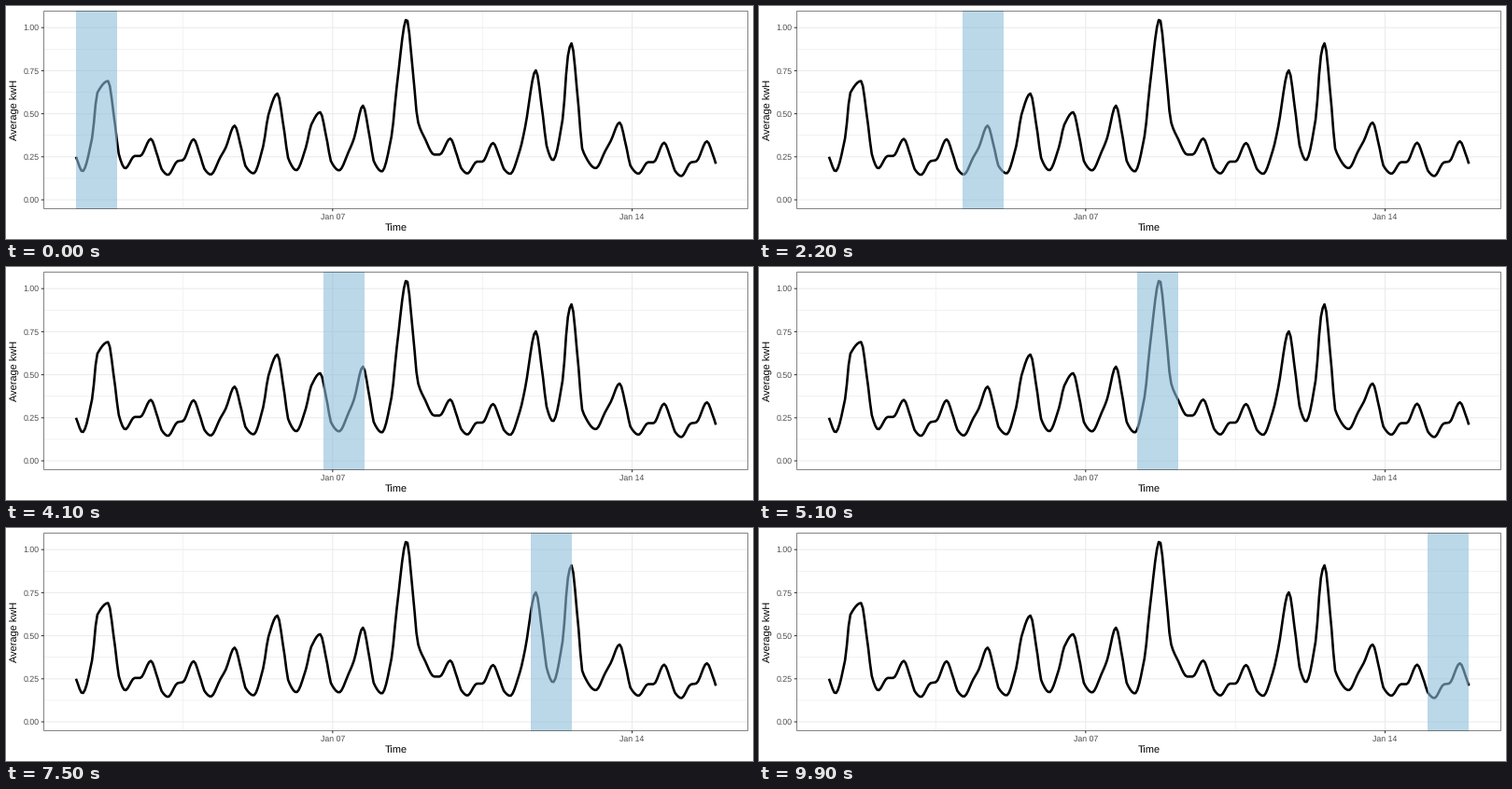
Recreate the animation shown at these times as a matplotlib script. Size 800 by 250 pixels, loop 10 s.

```python
import numpy as np
import matplotlib.pyplot as plt
from matplotlib.animation import FuncAnimation
from matplotlib.patches import Rectangle

plt.rcParams["font.family"] = "Liberation Sans"
plt.rcParams["text.hinting"] = "none"

W, H, DPI = 800, 250, 100
PX = 72 / DPI                      # one pixel in points
LEFT, RIGHT, TOP, BOTTOM = 40.5, 794.5, 5.5, 217.5
X0, HOUR = 74.95, 1.9088           # first reading, pixels per hour
Y0, UNIT = 208.0, 184.8            # zero line, pixels per kWh
FRAMES, WINDOW, LAST = 100, 23, 336
GRID, DARK, TICK_TEXT = "#ebebeb", "#333333", "#4d4d4d"

# Each day: night low, noon level, hour of the evening peak, peak
DAYS = [
    (0.166, 0.622, 18, 0.690),
    (0.183, 0.255, 18, 0.354),
    (0.145, 0.231, 18, 0.352),
    (0.147, 0.303, 17, 0.431),
    (0.154, 0.495, 17, 0.617),
    (0.172, 0.436, 17, 0.509),
    (0.171, 0.357, 17, 0.547),
    (0.165, 0.660, 17.5, 1.050),
    (0.360, 0.263, 18, 0.356),
    (0.153, 0.222, 18, 0.330),
    (0.151, 0.422, 18, 0.752),
    (0.230, 0.836, 14, 0.909),
    (0.184, 0.341, 17, 0.449),
    (0.152, 0.219, 18, 0.332),
    (0.138, 0.223, 18, 0.340),
]
LOW_HOUR, END_LOW = 3.6, 0.15


def load_keys():
    """Key points of the load: low, morning, noon, peak and evening fall."""
    keys = [(0, 0.25)]
    next_lows = [day[0] for day in DAYS[1:]] + [END_LOW]
    for d, ((low, noon, hour, peak), after) in enumerate(zip(DAYS, next_lows)):
        t = 24 * d
        rise = noon - low
        morning = low + min(0.054 + 0.3 * rise, rise)
        drop = peak - after
        keys += [(t + LOW_HOUR, low), (t + 9, morning), (t + 12, noon),
                 (t + hour, peak),
                 (t + hour + 3.6, after + 0.55 * drop),
                 (t + hour + 6.3, after + 0.14 * drop)]
    keys.append((24 * len(DAYS) + LOW_HOUR, END_LOW))
    return np.array(keys).T


def monotone(x, xk, yk):
    """Cubic through the keys that is flat at every extreme."""
    d = np.diff(xk)
    m = np.diff(yk) / d
    slope = np.r_[m[0], np.zeros(len(m) - 1), m[-1]]
    for k in range(1, len(m)):
        a, b = m[k - 1], m[k]
        if a * b > 0:
            wa, wb = d[k - 1] + 2 * d[k], 2 * d[k - 1] + d[k]
            slope[k] = (wa + wb) / (wb / a + wa / b)
    i = np.searchsorted(xk, x, side="right") - 1
    t = (x - xk[i]) / d[i]
    return ((1 + 2 * t) * (1 - t) ** 2 * yk[i]
            + t * (1 - t) ** 2 * d[i] * slope[i]
            + t ** 2 * (3 - 2 * t) * yk[i + 1]
            + t ** 2 * (t - 1) * d[i] * slope[i + 1])


fig = plt.figure(figsize=(W / DPI, H / DPI), dpi=DPI, facecolor="white")
ax = fig.add_axes([0, 0, 1, 1])
ax.set(xlim=(0, W), ylim=(H, 0))
ax.axis("off")


def line(xs, ys, color, width, z):
    ax.plot(xs, ys, color=color, lw=width * PX, zorder=z, snap=False,
            solid_capstyle="butt", solid_joinstyle="round")


def label(x, y, text, size, color, ha="center", **kw):
    ax.text(x, y, text, fontsize=size * PX, color=color, ha=ha,
            va="baseline", **kw)


def day_x(day):
    return X0 + (day - 1) * 24 * HOUR


def kwh_y(v):
    return Y0 - v * UNIT


# Grid, ticks and labels
for day in (3.5, 10.5):
    line([day_x(day)] * 2, [TOP, BOTTOM], GRID, 0.6, 1)
for v in np.arange(0.125, 1, 0.25):
    line([LEFT, RIGHT], [kwh_y(v)] * 2, GRID, 0.6, 1)
for day in (7, 14):
    x = day_x(day)
    line([x, x], [TOP, BOTTOM], GRID, 1.07, 2)
    line([x, x], [BOTTOM, BOTTOM + 2.74], DARK, 1.07, 5)
    label(x, 229, f"Jan {day:02d}", 8.8, TICK_TEXT)
for v in np.arange(0, 1.1, 0.25):
    y = kwh_y(v)
    line([LEFT, RIGHT], [y, y], GRID, 1.07, 2)
    line([LEFT - 2.74, LEFT], [y, y], DARK, 1.07, 5)
    label(35.8, y + 3.2, f"{v:.2f}", 8.8, TICK_TEXT, ha="right")
label((LEFT + RIGHT) / 2, 242, "Time", 11, "black")
label(13, (TOP + BOTTOM) / 2, "Average kwH", 11, "black",
      rotation=90, rotation_mode="anchor")

# Load curve, moving window and frame
hours = np.arange(24 * len(DAYS))
line(X0 + hours * HOUR, kwh_y(monotone(hours, *load_keys())), "black", 2.6, 3)
band = ax.add_patch(Rectangle((75, 5), 44, 213, lw=0, zorder=4,
                              facecolor=(140 / 255, 190 / 255, 218 / 255, 0.6)))
ax.add_patch(Rectangle((LEFT, TOP), RIGHT - LEFT, BOTTOM - TOP, fill=False,
                       edgecolor=DARK, alpha=0.6, lw=PX, zorder=6, snap=False))


def update(i):
    start = round(LAST * i / (FRAMES - 1))
    x1 = round(X0 + start * HOUR)
    x2 = round(X0 + (start + WINDOW) * HOUR)
    band.set_x(x1)
    band.set_width(x2 - x1)
    return (band,)


anim = FuncAnimation(fig, update, frames=FRAMES, interval=100,
                     repeat=True, repeat_delay=0)
plt.show()
```
